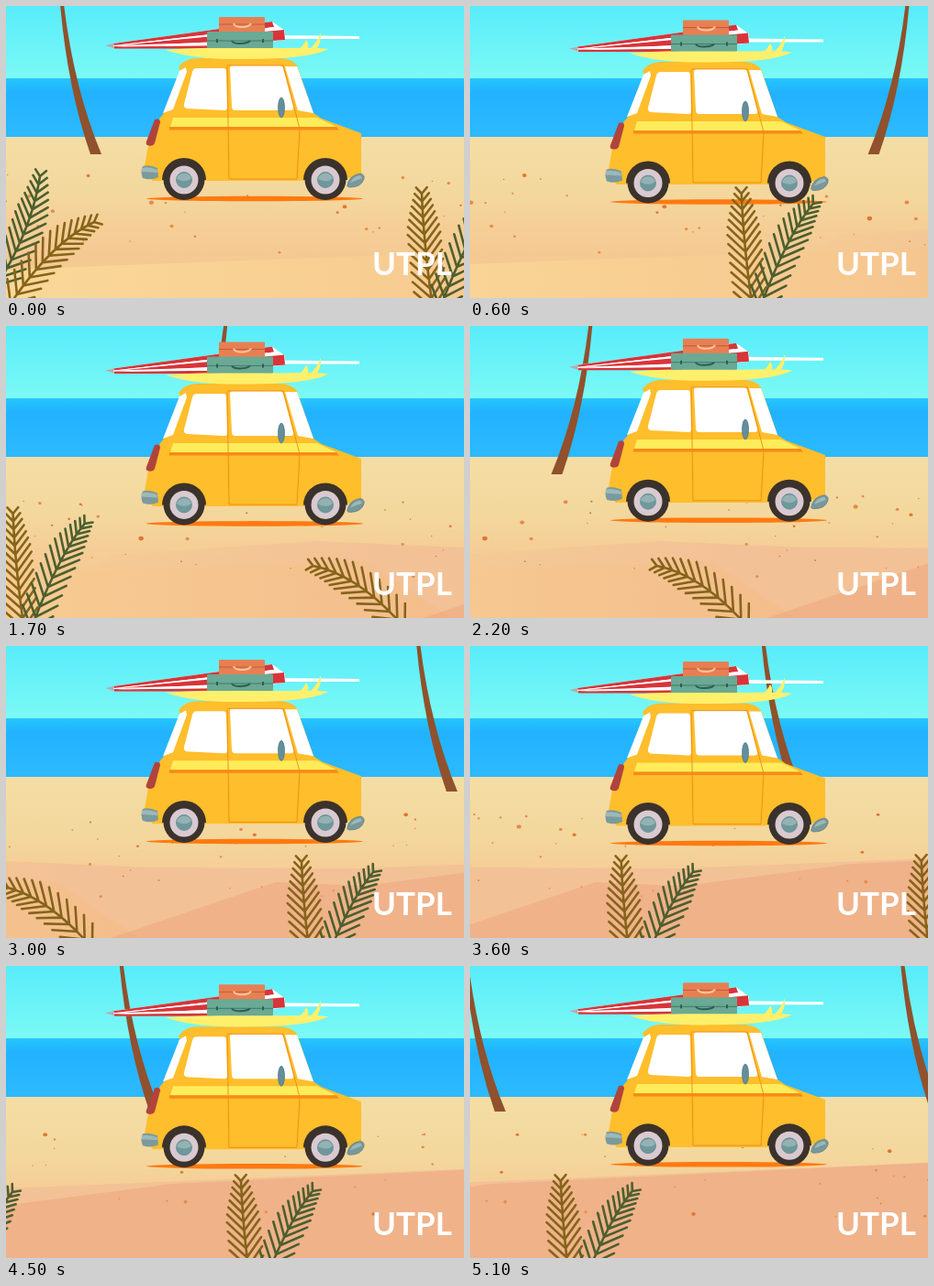
An HTML page for the animation above (5200 ms loop, 499 by 319 pixels).

```html
<!DOCTYPE html>
<html>
<head>
<meta charset="utf-8">
<style>
  html, body { margin: 0; height: 100%; overflow: hidden; }
  svg { display: block; }
</style>
</head>
<body>
<svg width="499" height="319" viewBox="0 0 499 319">
  <defs>
    <linearGradient id="sky" x2="0" y2="1"><stop stop-color="#58ecfb"/><stop offset="1" stop-color="#7cf9f5"/></linearGradient>
    <linearGradient id="sea" x2="0" y2="1">
      <stop stop-color="#24c6fd"/><stop offset=".25" stop-color="#22b2fe"/><stop offset="1" stop-color="#2dbaff"/>
    </linearGradient>
    <linearGradient id="sand" x2="0" y2="1">
      <stop stop-color="#f4dda4"/><stop offset=".38" stop-color="#f3d79d"/>
      <stop offset=".56" stop-color="#f5ce96"/><stop offset="1" stop-color="#f3c48e"/>
    </linearGradient>
    <linearGradient id="nearDune" gradientUnits="userSpaceOnUse" x2="930">
      <stop stop-color="#fad898"/><stop offset=".4" stop-color="#f8ce93"/><stop offset="1" stop-color="#f3bd8c"/>
    </linearGradient>
    <linearGradient id="farDune" gradientUnits="userSpaceOnUse" x1="500" x2="850">
      <stop stop-color="#f3c196" stop-opacity="0"/><stop offset="1" stop-color="#f3c196"/>
    </linearGradient>
    <path id="trunk" d="M0-2Q8 90 33 162H45Q15 90 4-2z" fill="#90512c"/>
    <g id="wheel">
      <path d="M-24 2A24 24 0 0 1 24 2z" fill="#3b322c"/>
      <circle cy="1.500" r="22.5" fill="#3b322c"/>
      <circle cy="2" r="15.5" fill="#d8cad0"/>
      <circle cy="2" r="8.5" fill="#6f989c" stroke="#5c8488" stroke-width=".7"/>
      <path d="M-8 1A8.5 8.5 0 0 1 8 0Q2 6-8 1z" fill="#94b2b3"/>
    </g>
  </defs>

  <rect width="499" height="80" fill="url(#sky)"/>
  <rect y="79" width="499" height="65" fill="url(#sea)"/>
  <rect y="143" width="499" height="176" fill="url(#sand)"/>
  <g id="ground">
    <path d="M480 319L560 250L784 235L941 242L1176 243L1440 232L1900 212V319z" fill="url(#farDune)"/>
    <path d="M0 288L499 269L839 257L930 319H0z" fill="url(#nearDune)"/>
    <path d="M900 319L1080 258L1176 262L1360 238L1900 212V319z" fill="#e99c76" opacity=".4"/>
  </g>
  <g id="trees"></g>

  <g id="car">
    <ellipse cx="271" cy="210.500" rx="118" ry="2.8" fill="#ff7a10"/>
    <g id="body">
      <path d="M188 67Q194 58 206 57H300Q312 58 317 65L335 117L344 123L387 139V187L318 191H160L150 180L156 146L168 122L172 117L190 71z" fill="#ffbe2b"/>
      <g fill="#fff">
        <path d="M196 67L189 71L171 117L182 113L197 72z"/>
        <path d="M208 68H237Q240 68 240 72L241 111Q241 114 238 114L197 112Q193 111 194 107L203 72Q204 68 208 68z"/>
        <path d="M247 65H298Q301 65 302 68L313 110Q314 114 310 114H250Q246 114 246 110L244 68Q244 65 247 65z"/>
        <path d="M304 66H317L335 117L318 114z"/>
      </g>
      <path d="M182 122H339L360 132H179z" fill="#ffec5a"/>
      <path d="M178 132H360L363 135.5H178z" fill="#f78b19"/>
      <path d="M241 66L243 189H317L320 134L302 65H241" fill="none" stroke="#ee8a18" stroke-width=".9"/>
      <path d="M162 124Q168 122 168 127L162 150Q160 154 154 152Q152 151 153 148z" fill="#b0443c"/>
      <ellipse cx="300" cy="111" rx="3.5" ry="11" fill="#628f9b" stroke="#4c7480" stroke-width=".7"/>
    </g>
    <path d="M149 175Q156 173 165 177L166 187Q158 191 149 188Q146 181 149 175z" fill="#7b9a9d"/>
    <path d="M148 177Q156 175 165 179V182L148 181z" fill="#9db8b8"/>
    <path d="M372 195Q374 185 386 183Q391 184 390 189Q387 198 375 198Q371 198 372 195z" fill="#78989b" stroke="#5c7c80" stroke-width=".7"/>
    <path d="M375 193Q378 186 386 185L388 188z" fill="#9db8b8"/>
    <use href="#wheel" x="194" y="188"/>
    <use href="#wheel" x="348" y="188"/>

    <path d="M300 32L385 33V36H300z" fill="#fff"/>
    <path d="M108 43L118 41V46z" fill="#b9a9a9"/>
    <path d="M117 41L290 17L304 27V37L232 46L118 46z" fill="#fff"/>
    <path d="M117 41L290 17L292 23L118 43zM118 43L303 26L304 37L290 38zM118 44L232 43V46.500H118z" fill="#d8343a"/>
    <path d="M118 43L292 23L298 24L118 44zM118 44.500L250 38L240 43z" fill="#fff"/>
    <path d="M174 48Q230 44 300 46Q340 45 351 47Q330 58 262 58Q205 59 174 48z" fill="#fff06c"/>
    <path d="M318 48Q324 44 327 37Q331 42 328 49zM330 48Q339 40 343 29Q344 40 337 49z" fill="#fff06c"/>
    <rect x="232" y="12" width="50" height="18" rx="1" fill="#e87f52"/>
    <path d="M232 20H282" stroke="#bd5c3a"/>
    <path d="M248 19Q249 23 257 23T267 19" fill="none" stroke="#f9c49c" stroke-width="2"/>
    <rect x="219" y="28" width="72" height="18" rx="1" fill="#6aa994"/>
    <path d="M219 38H291" stroke="#3f7a69"/>
    <path d="M246 38Q247 41 255 41T266 38M230 36V40M280 36V40" fill="none" stroke="#2f5d51" stroke-width="2"/>
  </g>
  <g id="leaves" fill="none" stroke-linecap="round"></g>
  <text x="399" y="294" font-family="Lato, sans-serif" font-weight="700" font-size="35" fill="#fff">UTPL</text>
</svg>
<script>
const LOOP = 5200, STEP = 100;
const $ = id => document.getElementById(id);
const add = (parent, markup) => parent.insertAdjacentHTML('beforeend', markup);
const BROWN = '#86641a', GREEN = '#4d5f30';

let seed = 11;
const random = () => (seed = seed * 16807 % 2147483647) / 2147483647;

// Pebbles strewn over the whole stretch of beach
for (let i = 0; i < 120; i++) {
  const x = random() * 1870, y = 184 + 90 * random() ** 1.4, r = .7 + 1.7 * random() ** 3;
  add($('ground'), `<ellipse cx="${x}" cy="${y}" rx="${r * 1.15}" ry="${r}" fill="${i % 3 ? '#e58a4a' : '#de7636'}"/>`);
}

// Trunks: x, y, direction of lean
for (const [x, y, lean] of [[59, 0, 1], [608, 0, -1], [1094, -3, 1], [1569, -3, 1]])
  add($('trees'), `<use href="#trunk" transform="translate(${x} ${y}) scale(${lean} 1)"/>`);

// A stem from tip to base with leaflets slanting towards the tip
function frond(color, [x0, y0], [x1, y1], [x2, y2]) {
  const count = Math.round(Math.hypot(x2 - x0, y2 - y0) / 10);
  let leaflets = '';
  for (let i = 0; i <= count; i++) {
    const k = i / count, j = 1 - k;
    const x = j * j * x0 + 2 * j * k * x1 + k * k * x2;
    const y = j * j * y0 + 2 * j * k * y1 + k * k * y2;
    const angle = Math.atan2(j * (y0 - y1) + k * (y1 - y2), j * (x0 - x1) + k * (x1 - x2));
    const length = 9 + 18 * Math.min(1, k * 2);
    for (const side of [-.72, .72])
      leaflets += `M${x} ${y}l${length * Math.cos(angle + side)} ${length * Math.sin(angle + side)}`;
  }
  add($('leaves'), `<path d="M${x0} ${y0}Q${x1} ${y1} ${x2} ${y2}${leaflets}" stroke="${color}" stroke-width="2.6"/>`);
}

function pair(x, y) {
  frond(BROWN, [x, y + 5], [x + 2, y + 60], [x + 12, y + 130]);
  frond(GREEN, [x + 78, y + 16], [x + 50, y + 50], [x + 20, y + 130]);
}

frond(GREEN, [37, 186], [28, 245], [-10, 305]);
frond(BROWN, [96, 236], [50, 258], [5, 325]);
pair(453, 200);
frond(BROWN, [780, 262], [830, 272], [880, 330]);
pair(1108, 231);
pair(1435, 230);

// Vertical sway of the car: time, offset
const sway = [[0, 0], [1300, 8], [2200, 1.7], [3000, 3], [3600, 5], [4500, 8.3], [5100, 6.3], [5200, 5.5]];
function swayAt(t) {
  const i = sway.findIndex(([end]) => end > t);
  const [t0, y0] = sway[i - 1], [t1, y1] = sway[i];
  return y0 + (y1 - y0) * (1 - Math.cos(Math.PI * (t - t0) / (t1 - t0))) / 2;
}

const move = (id, x, y) => $(id).setAttribute('transform', `translate(${x} ${y})`);

function draw(now) {
  const t = Math.floor(now % LOOP / STEP) * STEP, y = swayAt(t);
  move('ground', -.262 * t, 0);
  move('leaves', -.262 * t, 0);
  move('trees', -.2157 * t, 0);
  move('car', 0, y);
  move('body', 0, y * .12);
  requestAnimationFrame(draw);
}
draw(0);
</script>
</body>
</html>
```
